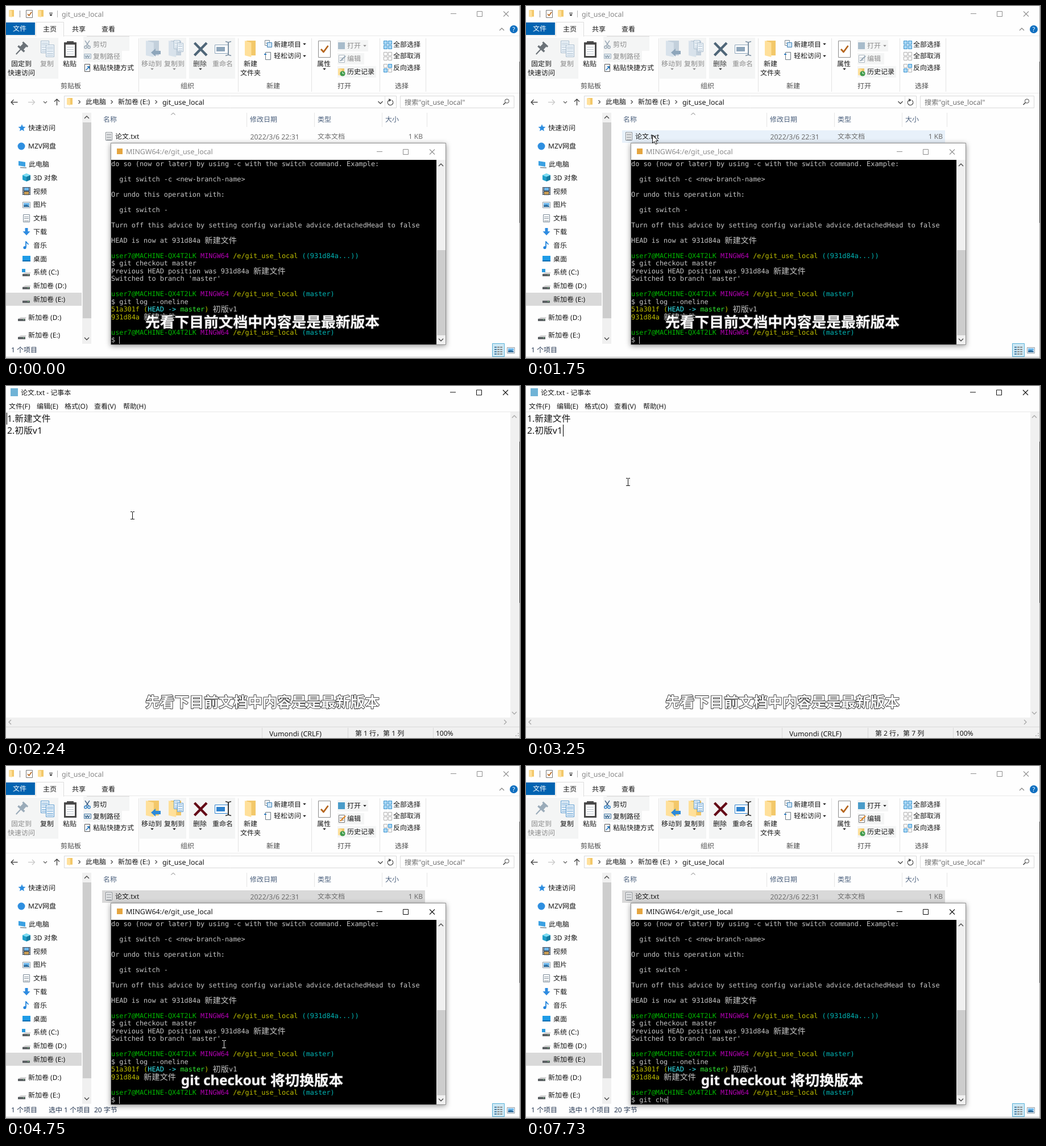
These frames come from a looping animation (904x620 px, 8000 ms). An HTML page with a canvas:

```html
<!DOCTYPE html>
<html lang="zh">
<head>
<meta charset="utf-8">
<title>git_use_local</title>
<style>
html, body { margin: 0; width: 904px; height: 620px; overflow: hidden; background: #fff; }
canvas { display: block; }
</style>
</head>
<body>
<canvas id="stage" width="904" height="620"></canvas>
<script>
const ctx = document.getElementById('stage').getContext('2d');
const LOOP = 8000;
const UI = '"Noto Sans", "Noto Sans CJK SC", sans-serif';
const MONO = '"DejaVu Sans Mono", monospace';
const CJK = '"Noto Sans CJK SC", sans-serif';
const INK = '#161616', DIM = '#8b8b8b';

// ---- helpers ----
function rect(x, y, w, h, c) { ctx.fillStyle = c; ctx.fillRect(x, y, w, h); }
function box(x, y, w, h, c, fill) {
  if (fill) rect(x, y, w, h, fill);
  ctx.strokeStyle = c; ctx.lineWidth = 1;
  ctx.strokeRect(x + .5, y + .5, w - 1, h - 1);
}
function path(p) {
  ctx.beginPath();
  for (let i = 0; i < p.length; i += 2) ctx.lineTo(p[i], p[i + 1]);
}
function line(c, w, ...p) { path(p); ctx.strokeStyle = c; ctx.lineWidth = w; ctx.stroke(); }
function poly(c, ...p) { path(p); ctx.closePath(); ctx.fillStyle = c; ctx.fill(); }
function disc(x, y, r, c) { ctx.beginPath(); ctx.arc(x, y, r, 0, 7); ctx.fillStyle = c; ctx.fill(); }
function text(s, x, y, c = INK, size = 12, align = 'left') {
  ctx.font = size + 'px ' + UI;
  ctx.textAlign = align;
  ctx.fillStyle = c;
  ctx.fillText(s, x, y + size * .37);
}
function mid(s, x, y, c) { text(s, x, y, c, 12, 'center'); }
function latest(keys, t) { return keys.filter(k => k[0] <= t).pop(); }

// chevron: dx, dy point the tip
function chevron(x, y, dx, dy, c = '#555', r = 4, w = 1.3) {
  const h = r / 2;
  line(c, w, x - dx * h - dy * r, y - dy * h - dx * r, x + dx * h, y + dy * h, x - dx * h + dy * r, y - dy * h + dx * r);
}
function drop(x, y, c = INK) { poly(c, x - 2.8, y - 1.3, x + 2.8, y - 1.3, x, y + 1.7); }
function winButtons(x, y, c) {
  rect(x, y - 1, 10, 1, c);
  box(x + 46, y - 5, 10, 10, c);
  line(c, 1.1, x + 93, y - 4.5, x + 102, y + 4.5);
  line(c, 1.1, x + 93, y + 4.5, x + 102, y - 4.5);
}

// ---- icons ----
function folder(x, y, w, h, on = true) {
  rect(x + w * .15, y, w * .85, h * .9, on ? '#f3c869' : '#c3d0dc');
  poly(on ? '#ffe09a' : '#d8e2eb', x, y, x + w * .6, y + h * .12, x + w * .6, y + h, x, y + h * .9);
}
function page(x, y, w, h, edge, fill = '#f6fafd', rows = 3) {
  box(x, y, w, h, edge, fill);
  for (let i = 1; i <= rows; i++) rect(x + 2, Math.round(y + h * i / (rows + 1)), w - 4, 1, edge);
}
function pages(x, y, on) {
  const c = on ? '#5b9bd0' : '#a9bccd';
  page(x, y, 15, 22, c, '#edf4fa', 5);
  page(x + 9, y + 7, 15, 22, c, '#edf4fa', 5);
}
function pin(on) {
  ctx.save();
  ctx.translate(28, 74);
  ctx.rotate(.75);
  const c = on ? '#6b7278' : '#9aabb9';
  rect(-6, -10, 12, 3, c);
  rect(-4, -8, 8, 9, c);
  rect(-7.5, 0, 15, 3.5, c);
  rect(-1, 3, 2, 12, c);
  ctx.restore();
}
function clipboard(on) {
  const c = on ? '#4a4a4a' : '#8097aa';
  rect(102, 64, 22, 27, c);
  rect(105, 68, 16, 20, on ? '#fff' : '#dce6ee');
  rect(107, 62, 12, 6, c);
  for (let i = 0; i < 4; i++) rect(107, 72 + i * 4, 12, 1, '#b9c3cb');
}
function scissors(on) {
  const c = on ? '#3c5f86' : '#9aa9b7';
  line(c, 1.4, 139, 61, 145, 70);
  line(c, 1.4, 147, 61, 141, 70);
  ctx.strokeStyle = on ? '#2f7fc4' : c;
  for (const x of [140, 146]) { ctx.beginPath(); ctx.arc(x, 72.5, 2.2, 0, 7); ctx.stroke(); }
}
function rename(on) {
  const c = on ? '#2f83cf' : '#8ea6bb';
  box(367, 68, 24, 16, c, '#fff');
  rect(370, 72, 15, 8, c);
  const d = on ? '#333' : '#7f93a5';
  rect(390, 64, 2, 22, d);
  line(d, 1.4, 386, 62.5, 391, 64, 396, 62.5);
  line(d, 1.4, 386, 87.5, 391, 86, 396, 87.5);
}
function grid(y, a, b) {
  for (let i = 0; i < 4; i++) {
    const sel = (i === 0 || i === 3) ? a : b;
    box(664 + (i % 2) * 8, y - 7 + (i >> 1) * 8, 7, 7, sel ? '#3c93cf' : '#b0b0b0', sel ? '#a9d8f5' : '#fff');
  }
}
function drive(x, y) {
  poly('#d4d4d4', x - 7, y + 1, x - 2, y - 2, x + 8, y - 2, x + 6, y + 1);
  rect(x - 7, y + 1, 13, 4, '#5c6064');
  rect(x + 2, y + 2, 2, 1, '#7ee08a');
}
function star(x, y, r, c) {
  const p = [];
  for (let i = 0; i < 10; i++) {
    const a = -Math.PI / 2 + i * Math.PI / 5, q = i % 2 ? r * .45 : r;
    p.push(x + q * Math.cos(a), y + q * Math.sin(a));
  }
  poly(c, ...p);
}
function picture(x, y) {
  box(x - 7, y - 5, 14, 11, '#8d9aa5', '#fff');
  rect(x - 5, y - 3, 10, 4, '#6db6ea');
  poly('#2e6e9e', x - 5, y + 4, x - 5, y + 1, x, y, x + 5, y + 2, x + 5, y + 4);
}

// ---- file manager ----
function ribbon(sel, canPaste) {
  const on = sel ? INK : DIM, pinC = sel ? DIM : INK, pasteC = canPaste ? INK : DIM;
  const shade = '#f4f5f5';
  rect(1, 56, 91, 72, shade);
  rect(136, 54, 81, 25, shade);
  rect(136, 79, 68, 20, shade);
  rect(142, 53, 75, 1, '#dedede');
  rect(235, 56, 82, 72, shade);
  rect(322, 56, 81, 72, shade);
  rect(583, 60, 54, 20, shade);
  rect(583, 83, 47, 20, shade);
  rect(583, 106, 68, 20, shade);
  for (const x of [233, 408, 537, 657, 738]) rect(x, 57, 1, 94, '#e3e3e3');

  pin(!sel);
  mid('固定到', 27, 102, pinC);
  mid('快速访问', 27, 118, pinC);
  pages(61, 61, sel);
  mid('复制', 72, 102, on);
  clipboard(canPaste);
  mid('粘贴', 112, 102, pasteC);
  scissors(sel);
  text('剪切', 153, 68, on);
  box(137, 84, 13, 9, sel ? '#4a7ba6' : '#a5b4c1', '#dfe9f1');
  line(sel ? '#27577f' : '#8798a6', 1.2, 139, 87, 141, 91, 143, 87, 145, 91, 147, 87);
  text('复制路径', 153, 89, on);
  page(138, 102, 10, 14, canPaste ? '#555' : '#9aabb9', '#fff', 0);
  line(canPaste ? '#2d7cc1' : '#8fa5b7', 1.6, 140.5, 113, 145.5, 108);
  poly(canPaste ? '#2d7cc1' : '#8fa5b7', 142, 106, 147, 106, 147, 111);
  text('粘贴快捷方式', 153, 109, pasteC);

  folder(246, 61, 23, 29, sel);
  const arrow = sel ? '#2c8ad8' : '#8ea6bb';
  poly(arrow, 255, 82, 263, 75, 263, 79, 272, 79, 272, 85, 263, 85, 263, 89);
  mid('移动到', 256, 102, on);
  drop(257, 111, on);
  folder(286, 61, 22, 29, sel);
  page(295, 60, 11, 16, sel ? '#5b9bd0' : '#a9bccd', '#f3f8fc', 4);
  page(301, 65, 11, 16, sel ? '#5b9bd0' : '#a9bccd', '#f3f8fc', 4);
  mid('复制到', 296, 102, on);
  drop(296, 111, on);
  const cross = sel ? '#640b17' : '#4f6678';
  line(cross, 4.4, 331.5, 65, 353, 87);
  line(cross, 4.4, 353, 65, 331.5, 87);
  mid('删除', 341, 102, sel ? INK : '#3a3a3a');
  drop(342, 111, '#333');
  rename(sel);
  mid('重命名', 381, 102, on);

  folder(420, 61, 19, 29);
  mid('新建', 430, 102);
  mid('文件夹', 430, 118);
  page(455, 60, 9, 10, '#7a8791', '#fff', 1);
  box(459, 64, 9, 9, '#3c7fb5', '#cfe5f6');
  text('新建项目', 471, 68);
  drop(525, 67);
  page(456, 81, 10, 14, '#6d7880', '#fff', 0);
  rect(454, 84, 4, 2, '#2d7cc1');
  text('轻松访问', 471, 88);
  drop(525, 88);

  box(549, 61, 22, 30, '#8b8b8b', '#fff');
  line('#b5651d', 2.8, 554, 76, 558.5, 81, 566.5, 70);
  mid('属性', 559, 102);
  drop(560, 111);
  rect(584, 64, 12, 12, sel ? '#4a9cc9' : '#a8bccb');
  text('打开', 600, 70, on);
  drop(631, 70, on);
  page(585, 86, 11, 14, sel ? '#777' : '#a9b5bf', '#fff', 2);
  line(sel ? '#e08a2c' : '#9cabb8', 2.4, 588, 97, 597, 88);
  text('编辑', 600, 93, on);
  folder(584, 110, 11, 13);
  disc(592, 119, 4.6, '#3f9b4c');
  line('#fff', 1, 592, 116, 592, 119, 594.5, 119);
  text('历史记录', 600, 116);

  grid(68, true, true);
  text('全部选择', 681, 68);
  grid(88, false, false);
  text('全部取消', 681, 88);
  grid(109, false, true);
  text('反向选择', 681, 109);

  mid('剪贴板', 114, 141, '#4a4a4a');
  mid('组织', 319, 141, '#4a4a4a');
  mid('新建', 470, 141, '#4a4a4a');
  mid('打开', 595, 141, '#4a4a4a');
  mid('选择', 696, 141, '#4a4a4a');
  rect(0, 153, 904, 1, '#ececec');
}

function addressBar() {
  line('#444', 1.4, 20.5, 169.5, 9, 169.5);
  line('#444', 1.4, 13.5, 165, 9, 169.5, 13.5, 174);
  line('#c9c9c9', 1.4, 39, 169.5, 50.5, 169.5);
  line('#c9c9c9', 1.4, 46, 165, 50.5, 169.5, 46, 174);
  chevron(69, 169.5, 0, 1, '#666', 3);
  line('#444', 1.4, 89.5, 175, 89.5, 164);
  line('#444', 1.4, 85, 168.5, 89.5, 164, 94, 168.5);
  box(102, 158, 585, 22, '#d9d9d9', '#fff');
  rect(666, 159, 1, 20, '#e0e0e0');
  folder(107, 162, 10, 13);
  for (const x of [129, 186, 264]) chevron(x, 169, 1, 0, '#555', 3);
  text('此电脑', 140, 169);
  text('新加卷 (E:)', 197, 169);
  text('git_use_local', 275, 169, INK, 12.4);
  chevron(658.5, 170, 0, 1, '#444', 4);
  ctx.beginPath();
  ctx.arc(676, 170, 4.7, -.9, 4.5);
  ctx.strokeStyle = '#444'; ctx.lineWidth = 1.3; ctx.stroke();
  poly('#444', 673, 163, 678, 165.5, 674, 168.5);
  box(693, 158, 201, 22, '#d9d9d9', '#fff');
  text('搜索"git_use_local"', 701, 169, '#6d6d6d', 12.2);
  ctx.beginPath();
  ctx.arc(881, 167.5, 3.6, 0, 7);
  ctx.strokeStyle = '#444'; ctx.stroke();
  line('#444', 1.6, 878.3, 170.2, 874.5, 174);
}

function sidebar() {
  rect(0, 505, 133, 23, '#d9d9d9');
  star(28, 215, 6.8, '#2b8de0');
  text('快速访问', 39, 215);
  disc(27, 247, 6.5, '#2f8fe0');
  text('MZV网盘', 39, 247);
  poly('#3aa0e2', 22, 273, 34, 275, 34, 283, 22, 281);
  line('#7c8791', 1.5, 25, 284.5, 36, 285);
  text('此电脑', 40, 279);
  const names = ['3D 对象', '视频', '图片', '文档', '下载', '音乐', '桌面', '系统 (C:)', '新加卷 (D:)', '新加卷 (E:)'];
  names.forEach((s, i) => text(s, 48, 302.3 + i * 23.82));
  poly('#1f9fc9', 29, 298, 36, 295, 43, 298, 43, 306, 36, 309, 29, 306);
  poly('#7fdcf2', 29, 298, 36, 295, 43, 298, 36, 301);
  poly('#157a9f', 36, 301, 43, 298, 43, 306, 36, 309);
  rect(29, 319, 14, 14, '#3a4a5c');
  rect(32, 320, 8, 5, '#6db6ea');
  rect(32, 327, 8, 5, '#c59a52');
  for (let y = 320; y < 333; y += 3) { rect(30, y, 1, 2, '#fff'); rect(41, y, 1, 2, '#fff'); }
  picture(36, 350);
  page(30, 367, 12, 14, '#7c8b98', '#fff', 3);
  poly('#2e8be0', 33.5, 391, 38.5, 391, 38.5, 397, 42.5, 397, 36, 404, 29.5, 397, 33.5, 397);
  line('#2385dd', 1.8, 35, 425, 35, 415, 39.5, 420);
  disc(33, 425.5, 2.6, '#2385dd');
  rect(29, 440, 14, 10, '#1e9be6');
  rect(29, 448, 14, 2, '#0c6db0');
  drive(36, 471);
  rect(28, 463, 6, 6, '#2a9be0');
  drive(36, 494);
  drive(36, 518);
  drive(28, 550);
  drive(28, 582);
  text('新加卷 (D:)', 39, 549);
  text('新加卷 (E:)', 39, 580);
  rect(134, 188, 16, 407, '#f0f0f0');
  rect(135, 205, 15, 345, '#cdcdcd');
  chevron(142, 196, 0, -1, '#444');
  chevron(142, 586, 0, 1, '#444');
}

function fileList(row) {
  for (const x of [423, 542, 661, 740]) rect(x, 188, 1, 25, '#e6e6e6');
  chevron(294, 190, 0, -1, '#777', 3.5, 1);
  const head = '#4a5f7c';
  text('名称', 171, 200, head);
  text('修改日期', 429, 200, head);
  text('类型', 548, 200, head);
  text('大小', 667, 200, head);
  if (row === 'hover') rect(169, 219, 568, 22, '#e8f1fa');
  if (row === 'active') box(169, 219, 568, 22, '#97cbe4', '#cce9f5');
  if (row === 'idle') rect(169, 219, 568, 22, '#d9d9d9');
  page(175, 222, 12, 15, '#868c92', '#fff', 5);
  text('论文.txt', 192, 230);
  text('2022/3/6 22:31', 429.5, 230, '#6d6d6d', 12.35);
  text('文本文档', 548, 230, '#6d6d6d');
  text('1 KB', 733, 230, '#6d6d6d', 12, 'right');
}

function explorer(row, focus, canPaste) {
  const sel = row === 'active' || row === 'idle';
  folder(5, 7, 9, 13);
  rect(24, 8, 1, 12, '#8f8f8f');
  box(35, 7, 12, 14, '#777', '#fff');
  line('#b5651d', 1.6, 38, 14, 40.5, 17, 45, 10.5);
  folder(56, 7, 10, 13);
  rect(76, 12, 6, 1, INK);
  drop(79, 16);
  rect(90, 8, 1, 12, '#b5b5b5');
  text('git_use_local', 98, 14, focus ? INK : '#868686', 12.4);
  winButtons(782, 14, focus ? '#111' : '#8f8f8f');
  rect(0, 52, 904, 1, '#e9e9e9');
  rect(0, 29, 51, 22, '#0063b1');
  mid('文件', 24, 40, '#fff');
  box(52, 28, 50, 26, '#dcdcdc', '#fdfdfd');
  rect(53, 52, 48, 2, '#fdfdfd');
  mid('主页', 77, 41);
  mid('共享', 128, 41);
  mid('查看', 180, 41);
  chevron(872, 41, 0, -1, '#8a8a8a');
  disc(893, 41, 7, '#0f6fc0');
  text('?', 893, 41, '#fff', 11, 'center');
  ribbon(sel, canPaste);
  addressBar();
  sidebar();
  fileList(row);
  const navy = '#22344f';
  text('1 个项目', 9, 606, navy);
  if (sel) {
    text('选中 1 个项目', 75, 606, navy);
    text('20 字节', 155, 606, navy);
  }
  box(855, 594, 22, 24, '#5cb2d8', '#cde8f4');
  for (let i = 0; i < 4; i++)
    for (let j = 0; j < 3; j++) rect(859 + j * 5, 600 + i * 4, 4, 2, j ? '#8b8b8b' : '#4b7fa5');
  picture(888, 606);
}

// ---- terminal ----
const CELL = 7.14, PITCH = 13.48, FG = '#c6c6c6';
const GREEN = '#00b800', MAG = '#b400b4', YEL = '#bfbf00', CYAN = '#00b4b4';
function term(row, col, s, c = FG, wide = false) {
  ctx.font = wide ? '14.2px ' + CJK : '11.86px ' + MONO;
  ctx.textAlign = 'left';
  ctx.fillStyle = c;
  ctx.fillText(s, 185 + col * CELL, 282.2 + row * PITCH + (wide ? .8 : 0));
}
function prompt(row, branch) {
  term(row, 0, 'user7@MACHINE-QX4T2LK', GREEN);
  term(row, 22, 'MINGW64', MAG);
  term(row, 30, '/e/git_use_local', YEL);
  term(row, 47, branch, CYAN);
}
function terminal(focus, typed, caret) {
  ctx.save();
  ctx.shadowColor = 'rgba(0,0,0,.4)';
  ctx.shadowBlur = 9;
  ctx.shadowOffsetY = 2;
  rect(184, 241, 590, 356, '#fff');
  ctx.restore();
  box(184, 241, 590, 356, '#8c8c8c', '#fff');
  rect(195, 251, 10, 10, '#e5a53f');
  text('MINGW64:/e/git_use_local', 211, 256.5, focus ? INK : '#8a8a8a', 12.4);
  winButtons(652, 257, focus ? '#111' : '#8f8f8f');
  rect(185, 271, 572, 325, '#000');
  rect(757, 271, 16, 325, '#f0f0f0');
  rect(758, 430, 15, 150, '#cdcdcd');
  chevron(765, 280, 0, -1, '#444');
  chevron(765, 588, 0, 1, '#444');

  term(0, 0, 'do so (now or later) by using -c with the switch command. Example:');
  term(2, 2, 'git switch -c <new-branch-name>');
  term(4, 0, 'Or undo this operation with:');
  term(6, 2, 'git switch -');
  term(8, 0, 'Turn off this advice by setting config variable advice.detachedHead to false');
  term(10, 0, 'HEAD is now at 931d84a');
  term(10, 23, '新建文件', FG, true);
  prompt(12, '((931d84a...))');
  term(13, 0, '$ git checkout master');
  term(14, 0, 'Previous HEAD position was 931d84a');
  term(14, 35, '新建文件', FG, true);
  term(15, 0, "Switched to branch 'master'");
  prompt(17, '(master)');
  term(18, 0, '$ git log --oneline');
  term(19, 0, '51a301f (', YEL);
  term(19, 9, 'HEAD ->', '#35e8f0');
  term(19, 17, 'master', '#30ec30');
  term(19, 23, ')', YEL);
  term(19, 25, '初版', FG, true);
  term(19, 29, 'v1');
  term(20, 0, '931d84a', YEL);
  term(20, 8, '新建文件', FG, true);
  prompt(22, '(master)');
  term(23, 0, '$ ' + typed);
  if (caret) rect(Math.round(185 + (2 + typed.length) * CELL), 582, 1, 13, FG);
}

// ---- text editor ----
function editor(atEnd, closeHot) {
  rect(8, 4, 13, 14, '#6fb3d6');
  text('论文.txt - 记事本', 26, 12);
  if (closeHot) rect(856, 0, 46, 25, '#b00070');
  winButtons(781, 11.5, '#111');
  if (closeHot) {
    line('#fff', 1.3, 874, 7, 883, 16);
    line('#fff', 1.3, 874, 16, 883, 7);
  }
  const menu = { '文件(F)': 5, '编辑(E)': 54, '格式(O)': 103, '查看(V)': 155, '帮助(H)': 206 };
  for (const s in menu) text(s, menu[s], 36);
  rect(0, 45, 904, 1, '#e8e8e8');
  text('1.新建文件', 2, 57.3, INK, 15.8);
  text('2.初版v1', 2, 78.5, INK, 15.8);
  rect(atEnd ? 65 : 1, atEnd ? 68 : 47, 1, 21, '#000');
  rect(887, 46, 16, 538, '#f0f0f0');
  rect(0, 584, 903, 36, '#f0f0f0');
  chevron(894, 54, 0, -1, '#a6a6a6');
  chevron(894, 576, 0, 1, '#a6a6a6');
  chevron(7, 592, -1, 0, '#a6a6a6');
  chevron(878, 592, 1, 0, '#a6a6a6');
  rect(0, 600, 903, 1, '#d9d9d9');
  for (const x of [450, 601, 751]) rect(x, 602, 1, 18, '#d7d7d7');
  text('Vumondi (CRLF)', 463, 612, INK, 12.4);
  text(atEnd ? '第 2 行，第 7 列' : '第 1 行，第 1 列', 614, 612);
  text('100%', 756, 612);
  for (const [x, y] of [[900, 611], [900, 615], [896, 615]]) rect(x, y, 2, 2, '#bcbcbc');
}

// ---- overlays ----
function caption(s, x, y, size, family = CJK) {
  ctx.font = 'bold ' + size + 'px ' + family;
  ctx.textAlign = 'left';
  ctx.lineJoin = 'round';
  ctx.strokeStyle = '#333';
  ctx.lineWidth = 1.8;
  ctx.strokeText(s, x, y);
  ctx.fillStyle = '#fff';
  ctx.fillText(s, x, y);
}
function arrow(x, y) {
  path([0, 0, 0, 14, 3.3, 11, 5.6, 16, 8, 15, 5.7, 10, 10, 10].map((v, i) => v + (i % 2 ? y : x)));
  ctx.closePath();
  ctx.fillStyle = '#fff'; ctx.fill();
  ctx.strokeStyle = '#111'; ctx.lineWidth = 1; ctx.stroke();
}
function beam(x, y, c) {
  rect(x, y - 6, 1, 13, c);
  rect(x - 3, y - 7, 3, 1, c); rect(x + 1, y - 7, 3, 1, c);
  rect(x - 3, y + 6, 3, 1, c); rect(x + 1, y + 6, 3, 1, c);
}

// time, pointer shape, x, y
const POINTER = [
  [0, ''], [250, 'beam', 330, 507], [500, 'beam', 300, 430], [750, 'beam', 265, 340],
  [1000, 'arrow', 236, 262], [1250, 'arrow', 226, 231], [1500, 'arrow', 223, 228], [1750, 'arrow', 222, 227],
  [2240, 'beam', 222, 228], [2750, 'beam', 196, 192], [3000, 'beam', 180, 172], [3250, 'beam', 179, 169],
  [3500, 'beam', 470, 130], [3750, 'arrow', 891, 52], [4010, 'arrow', 879, 20], [4240, 'arrow', 872, 19],
  [4490, 'arrow', 869, 18], [4750, 'beam', 383, 490], [5000, 'beam', 431, 548], [5250, 'beam', 433, 548],
  [5510, 'beam', 435, 550], [6000, '']
];
const TYPING = [[0, 0], [6000, 1], [6510, 2], [6760, 3], [7260, 5], [7500, 6], [7730, 7]];

function draw(t) {
  const notepad = t >= 2240 && t < 4750, late = t >= 4750, clicked = t >= 1990 && t < 2240;
  ctx.textRendering = 'geometricPrecision';
  rect(0, 0, 904, 620, '#fefefe');
  if (notepad) editor(t >= 3000, t >= 4010);
  else {
    const row = late ? 'idle' : clicked ? 'active' : t >= 1250 ? 'hover' : '';
    explorer(row, clicked, !clicked);
    if (!clicked) terminal(late, 'git che'.slice(0, latest(TYPING, t)[1]), t < 5250 || t >= 5510);
    rect(0, 618, 904, 1, '#b4b4b4');
  }
  rect(903, 0, 1, 620, '#a8a8a8');
  rect(903, 98, 1, 284, '#3c3c3c');

  const [, shape, x, y] = latest(POINTER, t);
  if (clicked) disc(222, 228, 12, 'rgba(250,184,40,.8)');
  if (shape === 'arrow') arrow(x + .5, y + .5);
  if (shape === 'beam') beam(x, y, notepad ? '#111' : '#e6e6e6');

  if (late) {
    caption('git checkout', 308, 562, 24, UI);
    caption('将切换版本', 465, 563, 25.6);
  } else caption('先看下目前文档中内容是是最新版本', 245, 566, 25.75);
}

function tick(now) {
  draw(now % LOOP);
  requestAnimationFrame(tick);
}
draw(0);
requestAnimationFrame(tick);
</script>
</body>
</html>
```
